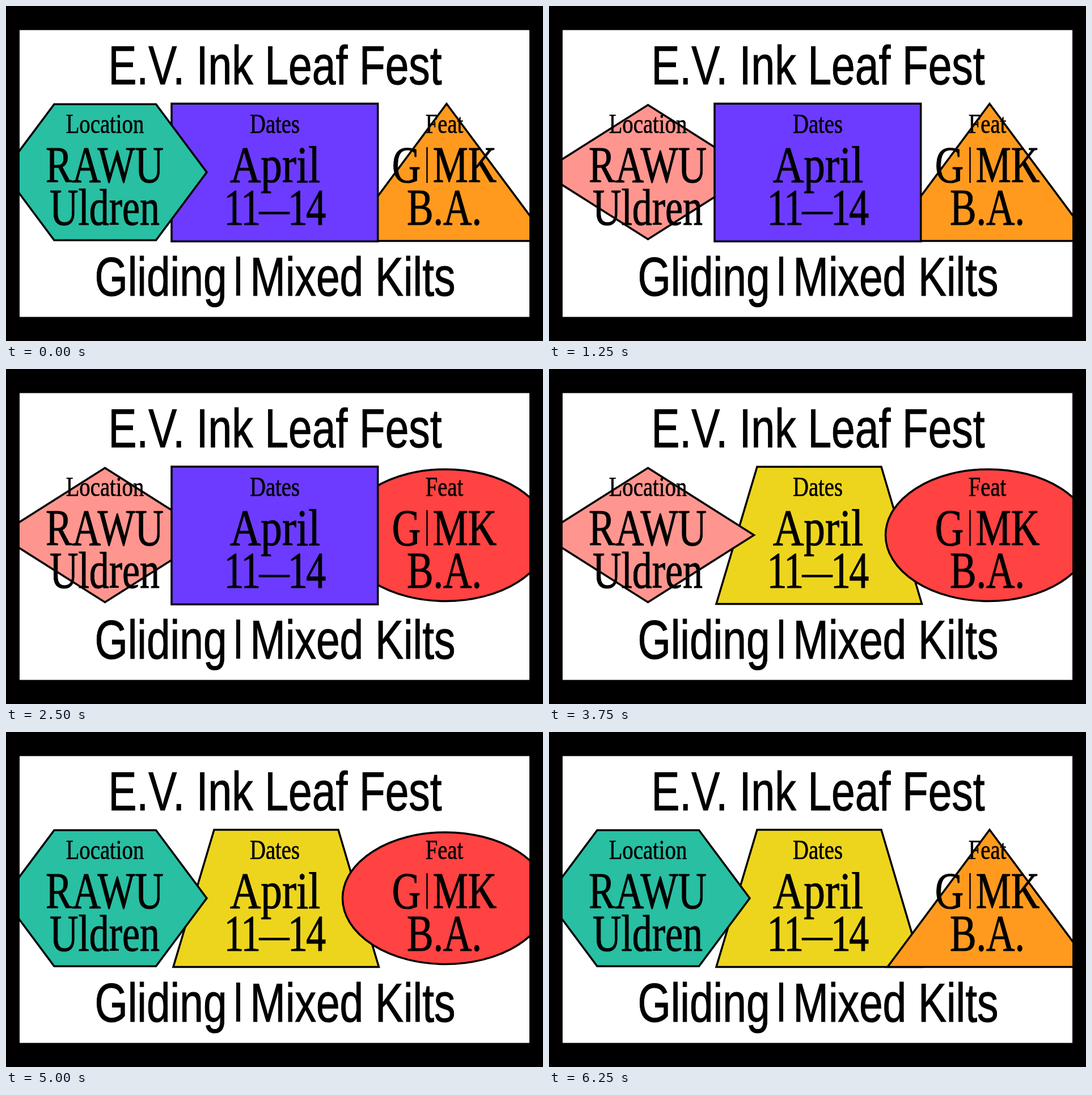
Animation, 947 px wide and 591 px high, one loop 7.5 s. Source, as an HTML page:

```html
<!DOCTYPE html>
<html lang="en">
<head>
<meta charset="utf-8">
<title>Ink Leaf Fest</title>
<style>
  html, body { margin: 0; width: 100%; height: 100%; overflow: hidden; background: #000; }
  svg { display: block; width: 100vw; height: 100vh; }
  #shapes { stroke: #000; stroke-width: 3.5; stroke-miterlimit: 10; }
  text { text-anchor: middle; stroke: #000; stroke-width: 1.1; }
  .head { font: 96px "Liberation Sans", Arial, sans-serif; }
  .label { font: 49px "Liberation Serif", "Times New Roman", serif; stroke-width: .7; }
  .big { font: 92px "Liberation Serif", "Times New Roman", serif; }
  .days { letter-spacing: -3.5px; }
  .dash { font-size: 70px; }
</style>
</head>
<body>
<svg viewBox="0 0 947 591">
  <clipPath id="page"><rect x="24" y="42.5" width="899" height="506"/></clipPath>
  <rect width="947" height="591"/>
  <rect x="24" y="42.5" width="899" height="506" fill="#fff"/>
  <g clip-path="url(#page)">
    <g id="shapes">
      <path id="trapezoid" fill="#edd51d" d="M367 172.5H586L657.5 414.5H295Z"/>
      <path id="diamond" fill="#ff958f" d="M174.5 174.5L361.5 293L174.5 411.5L-12.5 293Z"/>
      <path id="triangle" fill="#ff9a1e" d="M777 172.5L957 414.5H597Z"/>
      <ellipse id="oval" fill="#ff4242" cx="775" cy="293.2" rx="181.5" ry="116.3"/>
      <path id="box" fill="#6c3bff" d="M292 172.3H655.7V415.2H292Z"/>
      <path id="hexagon" fill="#28bfa3" d="M85 173.2H264.5L354 293.2L264.5 413.2H85L-4.5 293.2Z"/>
    </g>
    <g id="words"></g>
    <path d="M742.5 249V312" stroke="#000" stroke-width="2.5"/>
    <path d="M409.5 442V511" stroke="#000" stroke-width="7"/>
  </g>
</svg>
<script>
const STEP = 1250;
const byId = id => document.getElementById(id);

// Condensed type: one horizontal scale per style.
const condense = { head: .78, label: .79, big: .76 };

function write(style, x, y, text, scale = condense[style]) {
  byId("words").insertAdjacentHTML("beforeend",
    `<text class="${style}" transform="translate(${x} ${y}) scale(${scale} 1)">${text}</text>`);
}

write("head", 474.5, 137.5, "E.V. Ink Leaf Fest");
write("head", 273, 510.5, "Gliding");
write("head", 611.5, 510.5, "Mixed Kilts");
write("label", 174.5, 224, "Location");
write("label", 474, 224, "Dates");
write("label", 773, 224, "Feat");
write("big", 174, 311, "RAWU");
write("big", 174, 386, "Uldren");
write("big", 474.5, 311, "April", .82);
write("big", 473, 386, '<tspan class="days">11<tspan class="dash" dy="-4">—</tspan><tspan dy="4">14</tspan></tspan>');
write("big", 706, 311, "G");
write("big", 809, 311, "MK");
write("big", 773, 386, "B.A.");

function swap(on, first, second) {
  byId(first).style.display = on ? "" : "none";
  byId(second).style.display = on ? "none" : "";
}

// Each column swaps its shape for three steps, one step after its neighbour.
function draw(now) {
  const step = Math.floor(now / STEP) % 6;
  const changed = delay => (step - delay + 6) % 6 < 3;
  swap(changed(1), "diamond", "hexagon");
  swap(changed(2), "oval", "triangle");
  swap(changed(3), "trapezoid", "box");
}

const start = performance.now();
function tick() {
  draw(performance.now() - start);
  requestAnimationFrame(tick);
}
tick();
</script>
</body>
</html>
```
